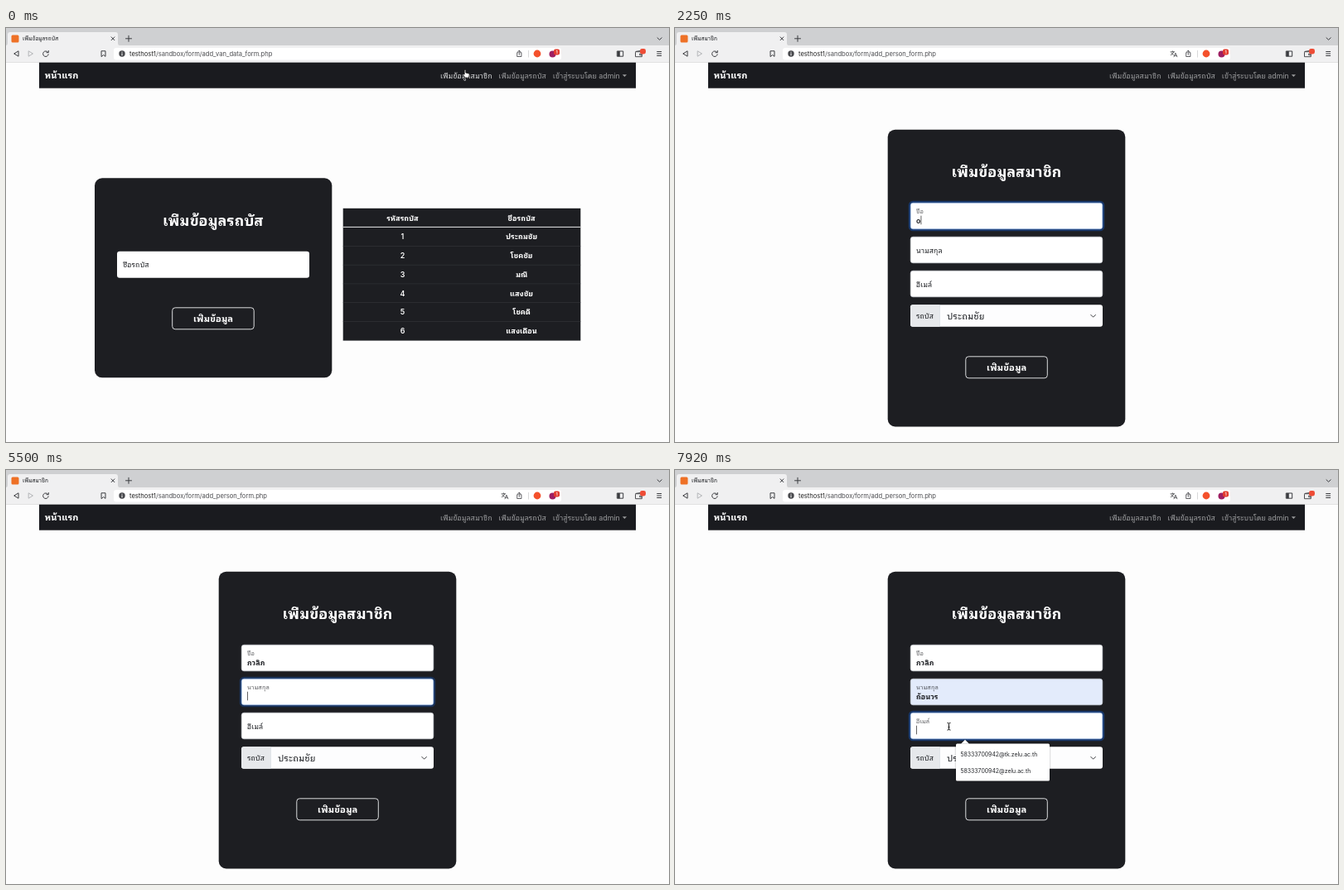
Write an HTML page that moves like this. It is 800 px wide and 500 px high and loops after 8000 ms.

```html
<!DOCTYPE html>
<html lang="th">
<head>
<meta charset="utf-8">
<title>Form</title>
<style>
html, body { margin: 0; width: 100%; height: 100%; overflow: hidden; background: #fdfdfd; }
svg { display: block; width: 800px; height: 500px; }
text { font-family: Inter, 'Noto Sans Thai Looped', 'Noto Looped Thai', 'Noto Sans Thai', 'Noto Sans', sans-serif; font-weight: 500; fill: #212327; white-space: pre; }
.b { font-weight: 600; }
.w { fill: #fff; font-weight: 600; }
.m { text-anchor: middle; }
.nav { fill: #9a9b9d; font-weight: 400; }
.i { fill: none; stroke: #3b3c40; stroke-width: 1; stroke-linecap: round; stroke-linejoin: round; }
</style>
</head>
<body>
<svg id="stage" viewBox="0 0 800 500"></svg>
<script>
const DARK = '#1d1e22', SIZE = 8.9, LOOP = 8000;
const NAME = 'กวลิภ', SURNAME = 'ถ้อนวร', MAIL = '58333700942@';
const BUSES = ['ประถมชัย', 'โชคชัย', 'มณี', 'แสงชัย', 'โชคดี', 'แสงเดือน'];
const LABELS = ['ชื่อ', 'นามสกุล', 'อีเมล์'];

const text = (s, x, y, size, cls = '', more = '') =>
  `<text x="${x}" y="${y}" font-size="${size}" class="${cls}" ${more}>${s}</text>`;
const rect = (x, y, w, h, fill, r = 0, more = '') =>
  `<rect x="${x}" y="${y}" width="${w}" height="${h}" rx="${r}" fill="${fill}" ${more}/>`;
const line = (d, more = '') => `<path class="i" d="${d}" ${more}/>`;
const group = (id, body, more = '') => `<g id="${id}" ${more}>${body}</g>`;
const button = (x, y) =>
  rect(x, y, 98.5, 26, 'none', 3.5, 'stroke="#f1f2f3" stroke-width=".9"') +
  text('เพิ่มข้อมูล', x + 49.3, y + 17.5, 11.1, 'w m');
const cross = (x, y, r) => line(`M${x - r} ${y - r}l${2 * r} ${2 * r}m0 ${-2 * r}l${-2 * r} ${2 * r}`);

function browser() {
  return rect(0, 0, 800, 21, '#cfd0d2') +
    '<path d="M0 21Q2 21 2 18V8Q2 5 5 5H132Q135 5 135 8V18Q135 21 137 21Z" fill="#f0f0f1"/>' +
    rect(0, 21, 800, 20.5, '#f0f0f1') + rect(0, 41, 800, .7, '#d8d8da') +
    rect(6.5, 8.5, 9, 9, '#ee7127', 1.5, 'id="site"') +
    text('', 20, 15.3, 6.67, '', 'id="tab"') +
    cross(129, 12.8, 1.9) +
    line('M144.5 12.8h7M148 9.3v7M786 11.8l2.6 2.5l2.6 -2.5') +
    line('M14.7 28l-5 3l5 3z') + line('M27.5 28l5 3l-5 3z', 'style="stroke:#b4b5b8"') +
    line('M50.6 29.2a3.3 3.3 0 1 0 .6 2.7M51.3 27.5v2.2h-2.3') +
    line('M115.4 27.8h4.6v6.6l-2.3 -1.9l-2.3 1.9z') +
    rect(130, 24, 540, 14.5, '#fff', 3) +
    '<circle cx="140" cy="31" r="3.7" fill="#47484c"/>' +
    rect(139.5, 30.4, 1, 2.9, '#fff') + rect(139.5, 28.7, 1, 1, '#fff') +
    text('', 149, 33.8, 7.6, '', 'id="url" style="font-weight:400;fill:#4c4d51"') +
    group('lang',
      rect(593, 24, 17.5, 14, '#dadbdc', 2.5, 'id="langBg"') +
      line('M598 28.8h4.6M600.3 27.8v1M601.9 28.8q-.7 2.6 -3.6 4M599 30.2q.9 1.7 2.3 2.3M602 34.8l1.9 -4.6l1.9 4.6M602.7 33.3h2.5', 'style="stroke-width:.75"')) +
    line('M618 29.7h-1.3v4.8h5.2v-4.8h-1.3M619.3 32.4v-5.1M617.7 28.7l1.6 -1.6l1.6 1.6', 'style="stroke-width:.8"') +
    rect(630, 27, .7, 8.5, '#c8c9cb') +
    '<circle cx="641" cy="31" r="4.4" fill="#f4512c"/>' +
    '<circle cx="659.5" cy="31.5" r="4" fill="#9e1f63"/>' +
    rect(661, 25.5, 7, 7, '#e23b2e', 2) + text('1', 664.5, 31.1, 5.2, 'w m') +
    line('M737.7 28h7v6.2h-7z') + rect(738, 28, 2.8, 6.2, '#3b3c40') +
    line('M760 28.7h7.3v6h-7.8v-5.2q0 -1 1 -1.2l5 -.8M767 31h-2.3v1.7h2.3', 'style="stroke-width:.9"') +
    rect(765, 25, 7, 6.5, '#ee4c36', 2.4) +
    line('M785.7 28.5h5M785.7 31h5M785.7 33.5h5');
}

function navbar() {
  return rect(40, 41.7, 720, 31, '#1a1b1f') +
    text('หน้าแรก', 46.5, 61, 11.1, 'w') +
    text('เพิ่มข้อมูลสมาชิก', 524, 60.5, SIZE, 'nav', 'id="link"') +
    text('เพิ่มข้อมูลรถบัส', 594.3, 60.5, SIZE, 'nav') +
    text('เข้าสู่ระบบโดย admin', 659.7, 60.5, SIZE, 'nav') +
    '<path d="M743.8 56.3h5.2l-2.6 2.6z" fill="#9a9b9d"/>';
}

function busPage() {
  let s = rect(107, 181.3, 286.3, 241, DARK, 9) +
    text('เพิ่มข้อมูลรถบัส', 250, 239, 17.8, 'w m') +
    rect(134, 269.8, 232, 32, '#fff', 3) + text('ชื่อรถบัส', 141, 289.3, SIZE) +
    button(200.7, 337.8) +
    rect(406.7, 217.8, 286.6, 159.5, DARK) +
    text('รหัสรถบัส', 478.5, 232.5, SIZE, 'w m') + text('ชื่อรถบัส', 622, 232.5, SIZE, 'w m') +
    rect(406.7, 239.9, 286.6, 1, '#e6e7e8');
  BUSES.forEach((bus, i) => {
    const y = 255.3 + i * 22.75;
    s += text(i + 1, 478.5, y, SIZE, 'w m') + text(bus, 622, y, SIZE, 'w m') +
      rect(406.7, y + 7.8, 286.6, .6, '#34363a');
  });
  return s;
}

const fieldY = i => 211 + i * 41;

function memberPage() {
  let s = rect(256.7, 122.7, 286.6, 358.8, DARK, 9) +
    text('เพิ่มข้อมูลสมาชิก', 400, 180, 17.8, 'w m');
  LABELS.forEach((label, i) => {
    const y = fieldY(i);
    s += rect(282.9, y - 1.1, 234.2, 34.2, 'none', 4.2, `id="glow${i}" stroke="#0d6efd" stroke-width="2.2"`) +
      rect(284.2, y + .2, 231.6, 31.6, '#fff', 3, `id="box${i}" stroke="#ced4da" stroke-width=".6"`) +
      text(label, 291, y + 19.5, SIZE, '', `id="label${i}"`) +
      text('', 291, y + 25, SIZE, 'b', `id="value${i}"`);
  });
  return s + rect(284, 334.2, 232, 26.6, '#fdfdfe', 3) +
    '<path d="M319 334.2H287q-3 0 -3 3v20.6q0 3 3 3H319z" fill="#e6e8eb"/>' +
    rect(319, 334.2, .6, 26.6, '#ced4da') +
    text('รถบัส', 291, 350.8, SIZE) + text('ประถมชัย', 328, 351.7, 11.1) +
    line('M501.8 346.4l2.8 2.8l2.8 -2.8') +
    button(350.8, 396.8) +
    rect(291, 0, .7, 10.6, '#222', 0, 'id="caret"');
}

function translateBox() {
  return rect(494.5, 40, 175.5, 25, '#fff', 2, 'style="filter:drop-shadow(0 1px 2px #0006)"') +
    text('Thai', 521.3, 54, 6.8, 'b m', 'style="fill:#2f62d9"') +
    text('English', 562.5, 54, 6.8, 'm', 'style="fill:#4a4b50"') +
    rect(503, 59.2, 36.5, 1.4, '#2f62d9') + rect(539.5, 60, 46.5, .6, '#d5d6d9') +
    line('M634.3 48.6h4.4M634.3 51.5h4.4M634.3 54.4h4.4') + cross(654.5, 51.5, 2);
}

const outline = 'fill="#111" stroke="#fff" stroke-width=".7" stroke-linejoin="round"';
const cursors =
  group('hand', '<path d="M-.9 -3.9a.9 .9 0 0 1 1.8 0V-1l3.3 .8q1.1 .3 1 1.4l-.6 3.9h-4.7l-2.8 -3.9q.1 -1.1 1.4 -.5l.6 .5z" fill="#fff" stroke="#111" stroke-width=".9" stroke-linejoin="round"/>') +
  group('arrow', `<path d="M0 0V10l2.3 -2.1l1.6 3.7l1.7 -.7l-1.6 -3.6h3.1z" ${outline}/>`) +
  group('beam', '<path d="M-2 -4.4q2 0 2 1.2v6.4q0 1.2 -2 1.2M2 -4.4q-2 0 -2 1.2v6.4q0 1.2 2 1.2M-1 .8h2" fill="none" stroke="#111" stroke-width=".9"/>');

const stage = document.getElementById('stage');
stage.innerHTML = rect(0, 0, 800, 500, '#fdfdfd') + browser() + navbar() +
  group('bus', busPage()) + group('member', memberPage()) +
  group('list', '') + group('popup', translateBox()) + cursors;

const el = {};
stage.querySelectorAll('[id]').forEach(e => el[e.id] = e);
const show = (e, on) => e.setAttribute('display', on ? 'inline' : 'none');
const clamp = v => Math.max(0, Math.min(1, v));

// Each table holds [start time, value]
const focusSteps = [[0, -1], [920, 0], [5420, 1], [7670, 2]];
const caretSteps = [[0, 0], [920, 1], [1500, 0], [2000, 1], [3000, 0], [3500, 1], [5830, 0], [6170, 1], [6580, 0], [7670, 1]];
const valueSteps = [
  [[0, ''], [2250, 'o'], [2500, 'or'], [2750, 'o'], [2830, ''], [3580, 'ก'], [3750, 'กว'], [3920, 'กวล'], [4420, 'กวลิ'], [4750, NAME]],
  [[0, ''], [6250, 'ถ'], [7170, SURNAME]],
  [[0, '']]
];
const lists = {
  names: { field: 0, width: 53.5, rows: ['มุริณ', 'Kawilaph', NAME, 'ฟาง', 'โชคดี', 'แสงเดือน'] },
  name: { field: 0, width: 40, rows: [NAME] },
  surname: { field: 1, width: 40, rows: [SURNAME] },
  mails: { field: 2, width: 113, rows: [MAIL + 'tk.zelu.ac.th', MAIL + 'zelu.ac.th'] }
};
const listSteps = [[0, ''], [1080, 'names'], [2250, ''], [3670, 'name'], [3920, ''], [6330, 'surname'], [7250, ''], [7750, 'mails']];
const path = [[0, 554, 55], [250, 554, 55], [900, 364.5, 223], [1500, 364.5, 223], [1750, 363, 338], [2000, 364, 226],
  [6670, 392, 286], [7000, 361, 301], [7170, 361, 301], [7500, 330.5, 309.7]];

const stepAt = (steps, t) => steps.filter(s => s[0] <= t).pop();
const valueAt = (steps, t) => stepAt(steps, t)[1];

function pointAt(t) {
  const n = path.findIndex(p => p[0] > t);
  if (n < 0) return path[path.length - 1].slice(1);
  const [t0, x0, y0] = path[n - 1], [t1, x1, y1] = path[n];
  const k = (t - t0) / (t1 - t0), e = k * k * (3 - 2 * k);
  return [x0 + (x1 - x0) * e, y0 + (y1 - y0) * e];
}

function drawList(list, hover) {
  if (!list) { el.list.innerHTML = ''; return; }
  const top = fieldY(list.field) + 37.5, h = list.rows.length * 20 + 5;
  el.list.innerHTML =
    group('', rect(339, top, list.width, h, '#fff', 1.5) + `<path d="M345 ${top + .3}l5 -5l5 5z" fill="#fff"/>`,
      'style="filter:drop-shadow(0 .5px 1px #0005)"') +
    (hover < 0 ? '' : rect(339, top + 2.5 + hover * 20, list.width, 20, '#e8e8ea')) +
    list.rows.map((r, i) => text(r, 344.5, top + 15 + i * 20, 6.9, '', 'style="font-weight:400"')).join('');
}

function drawField(i, t, focus, since, preview) {
  const on = focus === i, y = fieldY(i);
  const value = preview || valueAt(valueSteps[i], t);
  const glow = on ? clamp((since + 40) / 150) : 0;
  const lift = on ? clamp((since + 40) / 100) : value ? 1 : 0;
  const filled = preview || (i === 1 && t >= 7170);
  el['glow' + i].setAttribute('opacity', .32 * glow);
  el['box' + i].setAttribute('stroke', glow > .4 ? '#86b7fe' : '#ced4da');
  el['box' + i].setAttribute('fill', filled ? '#e3ebfb' : '#fff');
  const label = el['label' + i];
  label.setAttribute('y', y + 19.5 - 6.7 * lift);
  label.setAttribute('font-size', SIZE * (1 - .15 * lift));
  label.setAttribute('opacity', 1 - .3 * lift);
  el['value' + i].textContent = value;
  if (on) {
    el.caret.setAttribute('x', 291.2 + (value ? el['value' + i].getComputedTextLength() : 0));
    el.caret.setAttribute('y', y + 15.7);
    show(el.caret, valueAt(caretSteps, t) && !preview);
  }
}

function drawCursor(t, x, y, overList) {
  const inField = x > 284 && x < 516 && [0, 1, 2].some(i => y > fieldY(i) && y < fieldY(i) + 32);
  const kind = y < 66 ? 'hand' : inField && !overList && t >= 250 ? 'beam' : 'arrow';
  const visible = t < 2250 || t >= 6750;
  for (const k of ['hand', 'arrow', 'beam']) {
    show(el[k], visible && k === kind);
    el[k].setAttribute('transform', `translate(${x} ${y})`);
  }
}

function draw(t) {
  const member = t >= 80, popup = t >= 170 && t < 920;
  show(el.bus, !member);
  show(el.member, member);
  show(el.lang, member);
  show(el.langBg, popup);
  show(el.popup, popup);
  el.link.style.fill = member ? '' : '#d9dadb';
  el.site.setAttribute('rx', member && t < 330 ? 4.5 : 1.5);
  el.tab.textContent = member ? 'เพิ่มสมาชิก' : 'เพิ่มข้อมูลรถบัส';
  el.url.innerHTML = '<tspan fill="#222">testhost1</tspan>/sandbox/form/' +
    (member ? 'add_person_form.php' : 'add_van_data_form.php');

  const [x, y] = pointAt(t);
  const list = lists[valueAt(listSteps, t)];
  let hover = -1;
  if (list && (t < 2250 || t >= 6750) && x > 339 && x < 339 + list.width) {
    const row = Math.floor((y - fieldY(list.field) - 40) / 20);
    if (row >= 0 && row < list.rows.length) hover = row;
  }
  drawList(list, hover);

  const [start, focus] = stepAt(focusSteps, t);
  if (focus < 0) show(el.caret, false);
  for (let i = 0; i < 3; i++)
    drawField(i, t, focus, t - start, hover >= 0 && list.field === i ? list.rows[hover] : '');
  drawCursor(t, x, y, hover >= 0);
}

let last = -1;
const begin = performance.now();
function tick(now) {
  const n = Math.floor(((Math.max(0, now - begin) % LOOP) + 4) * 12 / 1000) % 96;
  if (n !== last) draw(Math.round(n * 100 / 12) * 10);
  last = n;
  requestAnimationFrame(tick);
}
draw(0);
requestAnimationFrame(tick);
</script>
</body>
</html>
```
